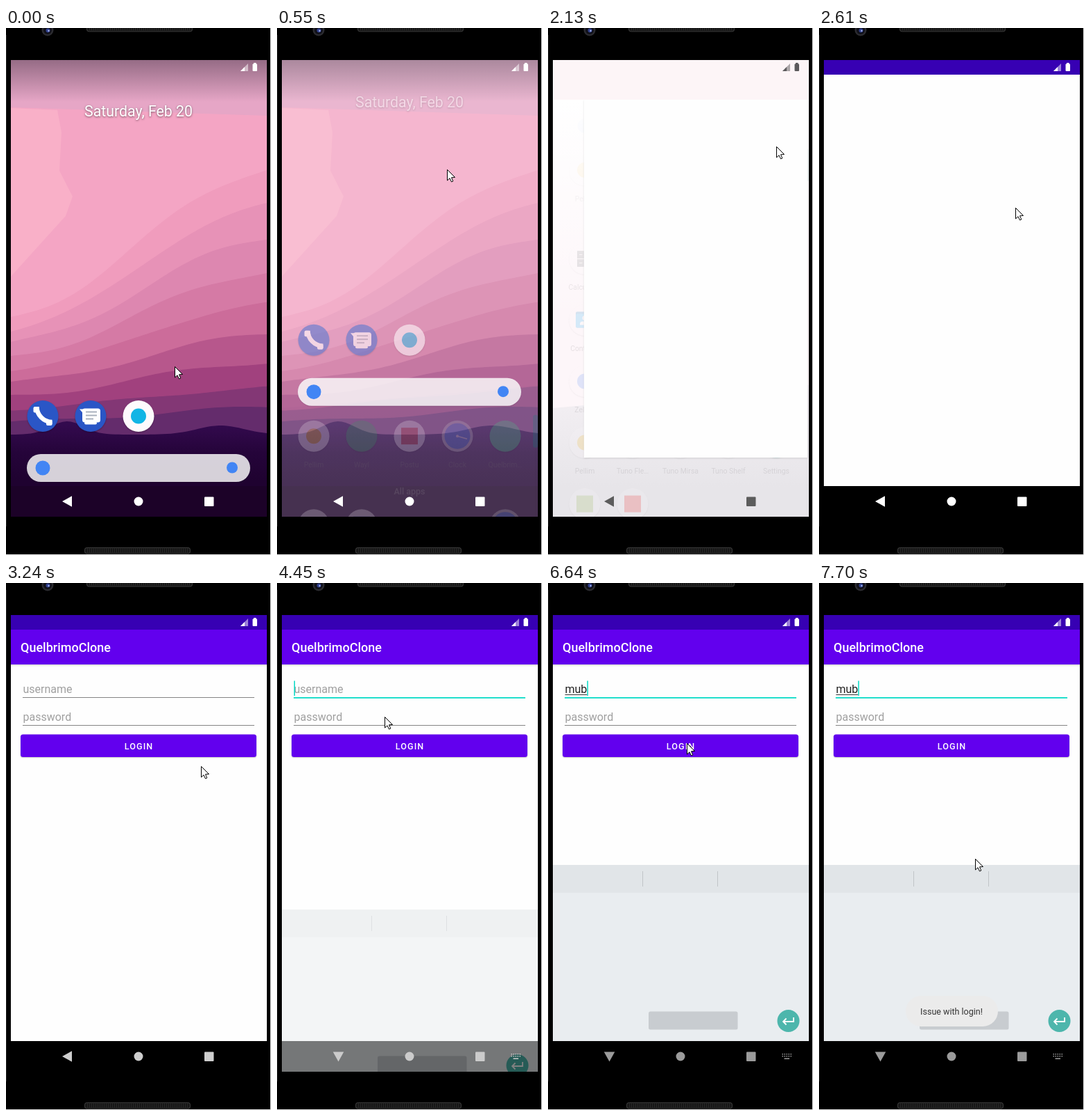
Animation, 382 px wide and 757 px high, one loop 8 s. Source, as an HTML page with a canvas:

```html
<!DOCTYPE html>
<html lang="en">
<head>
<meta charset="utf-8">
<title>Phone login</title>
<style>
html, body { margin: 0; width: 100%; height: 100%; overflow: hidden; background: #000; }
canvas { display: block; width: 382px; height: 757px; }
</style>
</head>
<body>
<canvas id="stage" width="382" height="757"></canvas>
<script>
const stage = document.getElementById('stage');
const buffer = document.createElement('canvas');
buffer.width = stage.width;
buffer.height = stage.height;
let ctx = stage.getContext('2d');

const LOOP = 8000, PACE = 130;
const L = 7, T = 46, R = 376, B = 702, NAV = 658;
const PURPLE = '#6200ee', TEAL = '#03dac5';

// Spans of activity, refreshed at about one picture per PACE ms.
const BURSTS = [[0, 300], [550, 1360], [1870, 2730], [2970, 3900], [4210, 4690], [5500, 5740], [6640, 7700]];

// Pointer moves: start, end, then the place reached.
const MOVES = [[0, 300, 257, 500], [300, 820, 239, 66], [820, 1360, 338, 188], [1600, 1610, 329, 170],
  [2130, 2730, 281, 263], [3240, 3510, 275, 258], [3510, 3900, 160, 149], [4210, 4450, 155, 192],
  [4450, 4690, 186, 414], [5490, 5740, 186, 222], [6630, 6640, 200, 230], [7030, 7570, 225, 396]];

const lerp = (a, b, p) => a + (b - a) * p;
const ramp = (t, a, b) => Math.min(1, Math.max(0, (t - a) / (b - a)));
const easeOut = p => Math.sin(p * Math.PI / 2);
const bell = (x, mid, width) => Math.exp(-(((x - mid) / width) ** 2));

// Hold the time between refreshes; a pause before a burst keeps the last picture.
function snap(t) {
  const [from, to] = BURSTS.filter(b => b[0] <= t).pop();
  if (t >= to) return t;
  const step = (to - from) / Math.round((to - from) / PACE);
  return from + Math.floor((t - from) / step + 1e-6) * step;
}

function pointerAt(t) {
  let x = 243, y = 486;
  for (const [from, to, nx, ny] of MOVES) {
    const p = easeOut(ramp(t, from, to));
    x = lerp(x, nx, p);
    y = lerp(y, ny, p);
  }
  return [x, y];
}

/* ---------- drawing helpers ---------- */
function rect(x0, y0, x1, y1, fill, r = 0) {
  ctx.fillStyle = fill;
  ctx.beginPath();
  ctx.roundRect(x0, y0, x1 - x0, y1 - y0, r);
  ctx.fill();
}

function circle(x, y, r, fill) {
  ctx.fillStyle = fill;
  ctx.beginPath();
  ctx.arc(x, y, r, 0, Math.PI * 2);
  ctx.fill();
}

function poly(points, fill) {
  ctx.fillStyle = fill;
  ctx.beginPath();
  points.forEach(([x, y]) => ctx.lineTo(x, y));
  ctx.closePath();
  ctx.fill();
}

function line(points, color, width) {
  ctx.strokeStyle = color;
  ctx.lineWidth = width;
  ctx.beginPath();
  points.forEach(([x, y]) => ctx.lineTo(x, y));
  ctx.stroke();
}

function text(str, x, y, size, fill, align = 'left', weight = 400) {
  ctx.font = `${weight} ${size}px Roboto, sans-serif`;
  ctx.textAlign = align;
  ctx.fillStyle = fill;
  ctx.fillText(str, x, y);
}

function fade(y0, y1, ...colors) {
  const g = ctx.createLinearGradient(0, y0, 0, y1);
  colors.forEach((c, i) => g.addColorStop(i / (colors.length - 1), c));
  return g;
}

function shadowed(alpha, blur, draw) {
  ctx.save();
  ctx.shadowColor = `rgba(0,0,0,${alpha})`;
  ctx.shadowBlur = blur;
  ctx.shadowOffsetY = 1;
  draw();
  ctx.restore();
}

// Draw a group as one picture with an opacity and a vertical shift.
function layer(alpha, dy, draw) {
  if (alpha <= 0) return;
  const main = ctx;
  ctx = buffer.getContext('2d');
  ctx.clearRect(0, 0, buffer.width, buffer.height);
  ctx.save();
  ctx.translate(0, dy);
  draw();
  ctx.restore();
  ctx = main;
  ctx.globalAlpha = Math.min(1, alpha);
  ctx.drawImage(buffer, 0, 0);
  ctx.globalAlpha = 1;
}

/* ---------- app icons ---------- */
const GLYPHS = {
  dot: c => circle(0, 0, 11, c),
  box: c => rect(-12, -12, 12, 12, c),
  none: () => {},
  clock() {
    circle(0, 0, 18.5, '#4285f4');
    line([[0, 0], [14, 4]], '#fff', 1.5);
    circle(0, 0, 2, '#fff');
  },
  calc() {
    for (let i = 0; i < 4; i++) {
      const x = i % 2 ? 0.5 : -11, y = i < 2 ? -11.5 : 0.5;
      rect(x, y, x + 10.5, y + 11, '#3f4245');
      rect(x + 3, y + 5, x + 7.5, y + 6, '#ddd');
    }
  },
  lens() {
    rect(-12, -8, 12, 10, '#546e7a', 2);
    circle(0, 1, 6, '#eceff1');
    circle(0, 1, 4, '#37474f');
  },
  card() {
    rect(-13, -12, 13, 11, '#0277bd', 2);
    rect(-13, -9, 13, 11, '#03a9f4', 2);
    circle(0, -3, 3.5, '#fff');
    rect(-7, 2, 7, 7, '#fff', [4, 4, 0, 0]);
  },
  folder() {
    rect(-12, -10, 0, 0, '#fff', 2);
    rect(-12, -7, 12, 10, '#fff', 2);
  },
  chat() {
    poly([[-16, -10], [-6, -10], [-10, -3]], '#fff');
    rect(-12, -11, 14, 9, '#fff', 3.5);
    rect(-9, 8, 9, 12, '#fff', 2);
    for (let i = 0; i < 3; i++) rect(-7, 5 * i - 7, i < 2 ? 9 : 4, 5 * i - 5, '#a8b0bd');
  },
  phone() {
    ctx.strokeStyle = '#fff';
    ctx.lineWidth = 6.5;
    ctx.beginPath();
    ctx.arc(13.5, -13.5, 22, Math.PI / 2, Math.PI);
    ctx.stroke();
    rect(-13.5, -13.5, -5.5, -5, '#fff', 2);
    rect(5, 5.5, 13.5, 13.5, '#fff', 2);
  },
  gear(c) {
    for (let i = 0; i < 4; i++) {
      rect(-3, -15, 3, 15, '#fff', 1);
      ctx.rotate(Math.PI / 4);
    }
    circle(0, 0, 11, '#fff');
    circle(0, 0, 5.5, c);
  }
};

const PALE = '#fefafc', BLUE = '#2a56c6';
const ALBUM = ['Pellim', PALE, 'dot', '#f4b400'];
const ROUTE = ['Wayl', '#2ea35a', 'none'];
const POST = ['Postu', PALE, 'box', '#dc4437'];
const CLOCK = ['Clock', '#cfd0d3', 'clock'];
const LOGIN_APP = ['Quelbrim…', '#3ddc84', 'none'];
const CHAT = ['Messages', BLUE, 'chat'];
const PHONE = ['Phone', BLUE, 'phone'];
const SHOP = ['Tuno Shelf', PALE, 'dot', '#12b5e5'];
const SUGGESTED = [ALBUM, ROUTE, POST, CLOCK, LOGIN_APP];
const LATE = ['Camera', 'Brelto'];
const APPS = [
  ['Calculator', PALE, 'calc'], ['Dayvonel', PALE, 'box', '#3f6fe0'],
  [LATE[0], PALE, 'lens'], [LATE[1], PALE, 'dot', '#34a853'], CLOCK,
  ['Contacts', PALE, 'card'], ['Kudlo', PALE, 'box', '#fbc02d'], ['Vem', PALE, 'dot', '#3f6de0'],
  ['Files', '#4285f4', 'folder'], POST,
  ['Zelpor', PALE, 'dot', '#4285f4'], LOGIN_APP, ROUTE, CHAT, PHONE,
  ALBUM, ['Tuno Fle…', PALE, 'box', '#d3123c'], ['Tuno Mirsa', PALE, 'dot', '#f9802d'],
  SHOP, ['Settings', '#00897b', 'gear', '#00897b'],
  ['Tabvoo…', PALE, 'box', '#8bb536'], ['Wuvlope', PALE, 'box', '#f00']
];
const colX = i => 53 + 69 * i;

function icon(x, y, [, back, kind, color]) {
  shadowed(.28, 2, () => circle(x, y, 22.5, back));
  ctx.save();
  ctx.translate(x, y);
  GLYPHS[kind](color);
  ctx.restore();
}

function labelled(x, y, app, loaded = true) {
  if (loaded) icon(x, y, app);
  text(app[0], x, y + 44.5, 10.4, '#6d696d', 'center');
}

/* ---------- phone body and system bars ---------- */
function body() {
  rect(0, 0, 382, 757, '#000');
  rect(381, 0, 382, 757, '#f2f2f2');
  rect(0, 756, 382, 757, '#e4e4e4');
  rect(0, 10, 1, 716, '#222');
  circle(60, 3, 8.5, '#2b2b30');
  circle(60, 3, 6, '#101018');
  circle(60.5, 3.5, 3, '#2f3f8c');
  circle(61.5, 4, 1.2, '#a9b8f0');
  grille(116, -4);
  grille(113, 746);
}

function grille(x, y) {
  rect(x, y, x + 153, y + 9.5, '#3a3a3a', 4);
  rect(x + 1, y + 1, x + 152, y + 8.5, '#161616', 3);
  ctx.setLineDash([1, 2]);
  for (let i = 2.5; i < 8; i += 2) line([[x + 4, y + i], [x + 149, y + i]], '#383838', 1);
  ctx.setLineDash([]);
}

function statusIcons(color) {
  ctx.globalAlpha = .5;
  poly([[349, 51], [349, 62], [338, 62]], color);
  ctx.globalAlpha = 1;
  poly([[344, 56], [344, 62], [338, 62]], color);
  rect(355.5, 51.5, 362, 62, color, 1);
  rect(357, 50, 360.5, 52, color);
}

function navIcons(tone, home, typing) {
  const c = `rgb(${tone},${tone},${tone})`;
  ctx.save();
  ctx.translate(88.5, 680);
  if (typing) ctx.rotate(-Math.PI / 2);
  poly([[-7.5, 0], [6.5, -7.8], [6.5, 7.8]], c);
  ctx.restore();
  if (home) circle(191, 680, 6.5, c);
  rect(286, 673.5, 299.5, 687, c, 1);
  if (!typing) return;
  for (let i = 0; i < 10; i++) {
    const x = 337.5 + (i % 5) * 3, y = 676 + (i > 4) * 3;
    rect(x, y, x + 1.5, y + 1.5, c);
  }
  rect(340.5, 682.5, 348, 684, c);
}

/* ---------- home screen ---------- */
const DUSK = [[240, 156, 189], [221, 135, 176], [204, 108, 154], [161, 65, 126], [100, 44, 108]];

function duskColor(u) {
  const s = u * (DUSK.length - 1), n = Math.min(DUSK.length - 2, Math.floor(s));
  return `rgb(${DUSK[n].map((c, i) => Math.round(lerp(c, DUSK[n + 1][i], s - n)))})`;
}

// Fill everything below the height given for v = 0..1 across the screen.
function ridge(height, fill) {
  const points = [[R, B], [L, B]];
  for (let v = 0; v <= 1; v += 1 / 64) points.push([lerp(L, R, v), height(v)]);
  poly(points, fill);
}

function wallpaper() {
  rect(L, T, R, B, '#f4a5c4');
  poly([[L, 115], [74, 118], [80, 150], [77, 205], [96, 242], [86, 270], [L, 357]], '#f9b0c8');
  poly([[L, T], [R, T], [R, 126], [L, 114]], '#e6a6c6');
  for (let i = 0; i < 9; i++) {
    const u = i / 8, left = lerp(415, 566, u), right = lerp(545, 203, (1 - u) ** 1.2);
    const rise = v => v - .08 * Math.sin(2 * Math.PI * v);
    ridge(v => lerp(left, right, rise(v)) + 2.5 * Math.sin(9 * v + 2 * i), duskColor(u));
  }
  ridge(v => 584 - 19 * bell(v, .22, .09) - 13 * bell(v, .82, .13), fade(570, 650, '#330a4e', '#25043a', '#1f0230'));
  rect(L, NAV, R, B, '#1c0228');
  rect(L, T, R, 106, fade(T, 106, 'rgba(70,50,70,.5)', 'rgba(70,50,70,0)'));
}

function home(p) {
  wallpaper();
  layer(1 - p * 2.5, -p * 60, () => shadowed(.5, 3, () =>
    text('Saturday, Feb 20', 191, 126.5, 21.3, '#fff', 'center')));
  layer(1 - p * 2, -531 * p, () => [PHONE, CHAT, SHOP].forEach((a, i) => icon(colX(i), 557.5, a)));
}

function searchBar() {
  shadowed(.12, 1, () => rect(30, 81, 352, 121, 'rgba(255,255,255,.82)', 20));
  circle(53, 101, 10.5, '#4285f4');
  circle(326, 100.5, 8, '#4285f4');
}

/* ---------- app drawer ---------- */
function drawerBack() {
  rect(L, T, R, B, '#fdf6f9');
  poly([[L, 546], [R, 513], [R, B], [L, B]], fade(515, 660, '#f4f0f4', '#e7e5e9'));
}

function drawerApps(ready) {
  SUGGESTED.forEach((a, i) => labelled(colX(i), 164.5, a));
  text('All apps', 191, 248, 12.5, '#9a969a', 'center', 500);
  APPS.forEach((a, i) =>
    labelled(colX(i % 5), 292 + 88 * Math.floor(i / 5), a, ready || !LATE.includes(a[0])));
  rect(372, 181, R, 660, 'rgba(60,40,60,.06)');
  rect(369, 134, R, 181, '#00897b', 3);
}

function launcher(t) {
  const p = ramp(t, 480, 820), open = ramp(t, 1880, 2160);
  const drawer = p >= .5, ready = t > 950;
  const dy = (1 - p) * 531 + 47 * open, seen = 1 - open;
  home(p);
  layer(p, 0, drawerBack);
  layer(seen, dy, searchBar);
  layer(p * seen, dy, () => drawerApps(ready));
  if (t >= 1870 && !open) circle(328.5, 165, 23, 'rgba(0,0,0,.18)');
  if (p === 1 && !open) rect(L, 661, R, B, 'rgba(255,255,255,.55)');
  if (open) {
    rect(L, 103, R, 420, fade(103, 420, '#fff', 'rgba(255,255,255,0)'));
    shadowed(.15, 2, () =>
      rect(lerp(306, 4, open), lerp(141, 96, open), lerp(352, 378, open), lerp(188, 698, open), '#fefefe'));
    rect(L, T, R, 103, '#fdf5f7');
  }
  statusIcons(!drawer ? '#fff' : ready ? '#5c5a5c' : '#a19ca1');
  navIcons(!drawer ? 255 : ready ? 92 : 117, !drawer, false);
}

/* ---------- login screen ---------- */
function caretOn(t) {
  const since = t < 5500 ? 4720 : 5640;
  return t < since || Math.floor((t - since) / 500) % 2 === 0;
}

function field(hint, y, value, focus) {
  text(value || hint, 24.5, y, 16, value ? '#222' : '#a0a0a0');
  rect(24, y + 6, 358, y + (focus ? 7.7 : 7), focus ? TEAL : '#858585');
}

function loginButton(t) {
  shadowed(.22, 1.5, () => rect(21, 217.5, 361, 250, PURPLE, 3.5));
  if (t > 6640 && t < 7030) {
    ctx.save();
    ctx.beginPath();
    ctx.roundRect(21, 217.5, 340, 32.5, 3.5);
    ctx.clip();
    circle(200, 232, .87 * (t - 6640), 'rgba(255,255,255,.24)');
    ctx.restore();
  }
  ctx.letterSpacing = '1.1px';
  text('LOGIN', 191.5, 238.5, 12.6, '#fff', 'center', 500);
  ctx.letterSpacing = '0px';
}

function form(t) {
  const focus = t >= 4210;
  rect(L, 67, R, 117, PURPLE);
  rect(L, 117, R, 120, fade(117, 120, 'rgba(0,0,0,.16)', 'rgba(0,0,0,0)'));
  text('QuelbrimoClone', 21, 99, 18, '#fff', 'left', 500);

  const typed = 'mub'.slice(0, Math.max(0, Math.floor((t - 5500) / 120) + 1));
  field('username', 158, typed, focus);
  const end = 24.5 + (typed ? ctx.measureText(typed).width : 0);
  rect(24.5, 160, end, 161, '#333');
  if (focus && caretOn(t)) rect(end, 140.5, end + 1.5, 162, TEAL);
  field('password', 198, '', false);
  loginButton(t);
}

function keyboard() {
  rect(L, 405, R, 705, '#e9edf0');
  rect(L, 405, R, 445, '#e1e5e8');
  [136, 244].forEach(x => rect(x, 414, x + 1, 436, '#c0c4c7'));
  rect(145, 615.5, 273.5, 641.5, '#c8ccd0', 2.5);
  circle(346.5, 629, 16, '#4db6ac');
  line([[354, 624], [354, 630], [339, 630]], '#fff', 1.8);
  line([[343.5, 625.5], [339, 630], [343.5, 634.5]], '#fff', 1.8);
}

function app(t) {
  const theme = ramp(t, 2160, 2480), rise = ramp(t, 4210, 4690);
  rect(L, T, R, B, '#fefefe');
  layer(theme, 0, () => {
    rect(L, T, R, 67, '#3700b3');
    rect(L, NAV, R, B, '#000');
  });
  if (t >= 3100) form(t);
  layer(rise, 128 * (1 - rise), keyboard);
  if (rise === 1) rect(L, NAV, R, B, '#000');
  layer(ramp(t, 7200, 7600), 0, () => {
    rect(125, 593, 258, 637, '#ebebeb', 22);
    text('Issue with login!', 191, 620, 12.5, '#333', 'center');
  });
  statusIcons(theme < .5 ? '#777' : '#fff');
  const tone = lerp(92, 255, theme) - 100 * ramp(t, 2970, 3510) + 48 * Math.sin(Math.PI * rise);
  navIcons(Math.round(tone), theme > .5, rise > 0);
}

function pointer(t) {
  const [x, y] = pointerAt(t);
  const shape = [[0, 0], [0, 15.5], [3.5, 12.3], [6, 17.5], [8.3, 16.5], [6, 11.3], [11, 11], [0, 0]];
  ctx.save();
  ctx.translate(Math.round(x) + .5, Math.round(y) + .5);
  poly(shape, '#fff');
  line(shape, '#000', 1);
  ctx.restore();
}

function draw(now) {
  const t = snap(now % LOOP);
  body();
  ctx.save();
  ctx.beginPath();
  ctx.rect(L, T, R - L, B - T);
  ctx.clip();
  if (t < 2160) launcher(t); else app(t);
  pointer(t);
  ctx.restore();
}

let start;
function tick(now) {
  start ??= now;
  draw(now - start);
  requestAnimationFrame(tick);
}
draw(0);
requestAnimationFrame(tick);
</script>
</body>
</html>
```
